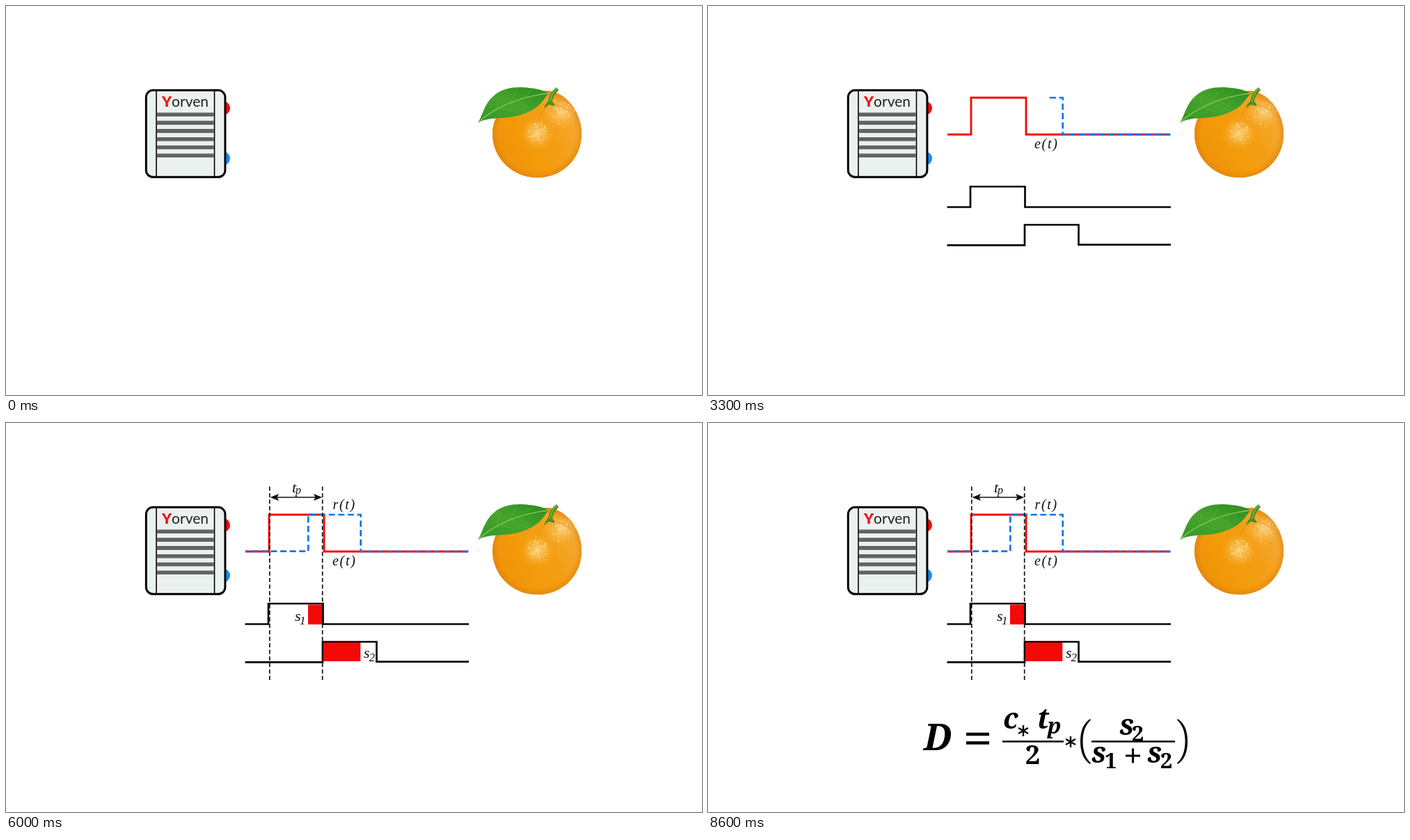
Recreate the animation shown at these times as an HTML page. Size 1000 px wide and 560 px high, loop 9.6 s.

```html
<!DOCTYPE html>
<html lang="en">
<head>
<meta charset="utf-8">
<title>Pulsed time of flight</title>
<style>
  html, body { margin: 0; width: 100%; height: 100%; overflow: hidden; background: #fff; }
  svg { display: block; width: 100vw; height: 100vh; }
  .label { font: italic 20px "Liberation Serif", serif; fill: #111; }
  .wave { fill: none; stroke-width: 2.7; stroke: #050505; }
  .math { font: italic bold 41px "Noto Serif", serif; }
  .num { font-style: normal; }
  .sub { font-size: 31px; }
</style>
</head>
<body>
<svg viewBox="0 0 1000 560">
  <defs>
    <linearGradient id="peel" x1="0" y1=".75" x2="1" y2=".25">
      <stop offset="0" stop-color="#ee910b"/>
      <stop offset=".35" stop-color="#f39a08"/>
      <stop offset=".65" stop-color="#f49f17"/>
      <stop offset="1" stop-color="#f5ac3a"/>
    </linearGradient>
    <radialGradient id="rim">
      <stop offset=".86" stop-color="#d97a10" stop-opacity="0"/>
      <stop offset="1" stop-color="#d97a10" stop-opacity=".5"/>
    </radialGradient>
    <radialGradient id="glow">
      <stop offset="0" stop-color="#fff0bd" stop-opacity=".85"/>
      <stop offset="1" stop-color="#fcc050" stop-opacity="0"/>
    </radialGradient>
    <linearGradient id="leaf" x1="0" y1="1" x2="1" y2="0">
      <stop offset="0" stop-color="#35932a"/>
      <stop offset=".5" stop-color="#46a52c"/>
      <stop offset="1" stop-color="#2b8b20"/>
    </linearGradient>
  </defs>

  <g id="camera">
    <circle cx="312" cy="147" r="10" fill="#f70606"/>
    <circle cx="312" cy="219.5" r="10" fill="#168af6"/>
    <rect x="201.3" y="121.3" width="113.6" height="125" rx="10" fill="#ebf1ee" stroke="#000" stroke-width="3"/>
    <path d="M216 122V246M299.5 122V246" stroke="#000" stroke-width="1.6"/>
    <path id="slots" stroke="#636363" stroke-width="5.6"/>
    <text x="224" y="145" font-family="Lato, sans-serif" font-size="21" fill="#222"><tspan fill="#f01414" font-weight="900">Y</tspan>orven</text>
  </g>

  <g id="orange">
    <path id="body" d="M699 182C700 155 722 126 775 122C802 121 827 151 827 184C827 220 799 247 763 247C727 247 698 218 699 182Z" fill="url(#peel)"/>
    <use href="#body" style="fill:url(#rim)"/>
    <path d="M699 182C700 155 722 126 775 122C802 121 827 151 827 184C827 220 799 247 763 247C727 247 698 218 699 182Z" fill="url(#rim)"/>
    <ellipse cx="797" cy="153" rx="27" ry="23" fill="url(#glow)" opacity=".7"/>
    <ellipse cx="763" cy="184" rx="25" ry="24" fill="url(#glow)" opacity=".75"/>
    <g id="pores" fill="#ffeab0"/>
    <path d="M784 142Q798 142 811 152M781 145Q789 150 791 158M778 145Q769 151 765 160" fill="none" stroke="#d98010" stroke-width="1" opacity=".6"/>
    <path d="M773 147Q774 142 779 137Q781 124 791 117L794 121Q785 130 785 138Q789 141 788 144L780 142Z" fill="#4c8f20"/>
    <path d="M782 138Q783 126 792 118" fill="none" stroke="#86b83d" stroke-width="1.5"/>
    <path d="M678 168C685 157 687 141 700 130C714 116 736 116 752 118C765 119 772 122 780 126C774 131 771 139 763 145C751 155 731 160 714 161C699 162 689 162 678 168Z" fill="url(#leaf)"/>
    <path d="M679 167C702 146 739 130 779 126" fill="none" stroke="#8ac951" stroke-width="1.3"/>
    <path d="M705 149L709 132M724 139L733 123M744 132L755 121M710 146L729 152M733 136L750 145" fill="none" stroke="#68b83f" stroke-width=".8" opacity=".7"/>
  </g>

  <path id="emit" class="wave" style="stroke:#f50a0a;stroke-width:2.9" d="M344 185H378V132H457V185H664"/>
  <path id="back" class="wave" style="stroke:#1173ea" stroke-dasharray="9 4.6" d="M664.5 185H509.7V132H434.3V184.7H344"/>
  <path id="gate1" class="wave" d="M343.5 289.5H377V260H455.5V289.5H665"/>
  <path id="gate2" class="wave" d="M343.5 344.3H455V315H532.5V343.7H665"/>
  <path id="charge" fill="#f40909" d="M434 261.5H454V290H434ZM456 316H509.3V343H456Z"/>

  <text id="eText" class="label" x="469" y="204.5" letter-spacing="1.7">e(t)</text>
  <text id="rText" class="label" x="469.5" y="123.5" letter-spacing="1.7">r(t)</text>
  <g id="sText" class="label" style="font-size:22px">
    <text x="415" y="284.5">s</text><text x="422" y="289.5" font-size="17">1</text>
    <text x="514" y="338">s</text><text x="521.5" y="342.5" font-size="17">2</text>
  </g>

  <path id="guides" d="M378.8 91.5V370M454.7 91.5V370" stroke="#111" stroke-width="1.7" stroke-dasharray="6 3.4"/>
  <g id="arrow">
    <path d="M386 107H448" stroke="#111" stroke-width="1.4"/>
    <path d="M379.5 107L392 102L389.5 107L392 112ZM454.3 107L442 102L444.500 107L442 112Z" fill="#111"/>
  </g>
  <g id="tpText" class="label">
    <text x="411" y="99.5" font-size="22">t</text><text x="416" y="102" font-size="16">p</text>
  </g>

  <g id="formula" class="math">
    <text x="310" y="471" style="font-size:52px">D</text>
    <path d="M371 448H404M371 460.500H404" stroke="#000" stroke-width="4.4"/>
    <text x="424" y="440">c</text>
    <text x="473" y="440">t</text>
    <text class="sub" x="488" y="447">p</text>
    <text class="num" x="456" y="491" style="font-size:38px">2</text>
    <text x="591" y="449">s</text>
    <text class="num sub" x="609" y="457.500">2</text>
    <text x="551" y="489">s</text>
    <text class="num sub" x="570" y="497">1</text>
    <text x="631" y="489">s</text>
    <text class="num sub" x="650" y="497">2</text>
    <path d="M423 458.500H511M551 458.500H671" stroke="#000" stroke-width="2.4"/>
    <path d="M600 479H621M610.500 468.500V489.500" stroke="#000" stroke-width="3"/>
    <path d="M549 426Q535 435 535 458.500Q535 482 549 491L550 489.500Q538.500 479 538.500 458.500Q538.500 438 550 427.500ZM675 426Q689 435 689 458.500Q689 482 675 491L674 489.500Q685.500 479 685.500 458.500Q685.500 438 674 427.500Z"/>
    <path id="stars" stroke="#000" stroke-width="2.4"/>
  </g>
</svg>
<script>
const LOOP = 9600, STEP = 100;
const NS = 'http://www.w3.org/2000/svg';
const $ = id => document.getElementById(id);

function add(parent, tag, attrs) {
  const el = parent.appendChild(document.createElementNS(NS, tag));
  for (const k in attrs) el.setAttribute(k, attrs[k]);
  return el;
}

// Repeated details
$('slots').setAttribute('d', Array.from({ length: 6 }, (_, i) => `M216.8 ${156.3 + i * 11.8}H298.7`).join(''));

const star = (x, y) => [0, 60, 120].map(deg => {
  const a = (deg + 90) * Math.PI / 180, dx = 8 * Math.cos(a), dy = 8 * Math.sin(a);
  return `M${x - dx} ${y - dy}L${x + dx} ${y + dy}`;
}).join('');
$('stars').setAttribute('d', star(453, 443) + star(521, 459));

let seed = 7;
const rnd = () => (seed = seed * 16807 % 2147483647) / 2147483647;
function scatter(n, x, y, spread) {
  for (let i = 0; i < n; i++) {
    const a = rnd() * 2 * Math.PI, r = spread * Math.sqrt(rnd());
    add($('pores'), 'circle', {
      cx: x + r * Math.cos(a), cy: y + r * Math.sin(a),
      r: .4 + rnd() * .7, opacity: .3 + rnd() * .6
    });
  }
}
scatter(90, 763, 184, 16);
scatter(40, 801, 157, 18);

// Each wiped part is shown through its own clip rectangle
const svg = document.querySelector('svg');
function wiper(id) {
  const clip = add(svg.querySelector('defs'), 'clipPath', { id: id + 'Clip' });
  const rect = add(clip, 'rect', {});
  $(id).setAttribute('clip-path', `url(#${id}Clip)`);
  return (x0, y0, x1, y1) => {
    const box = { x: x0, y: y0, width: Math.max(0, x1 - x0), height: Math.max(0, y1 - y0) };
    for (const k in box) rect.setAttribute(k, box[k]);
  };
}
const wipe = {};
for (const id of ['emit', 'back', 'gate1', 'gate2', 'charge', 'guides']) wipe[id] = wiper(id);

// Piecewise linear track: time, value, time, value, ...
function track(t, ...p) {
  if (t <= p[0]) return p[1];
  for (let i = 2; i < p.length; i += 2)
    if (t <= p[i]) return p[i - 1] + (p[i + 1] - p[i - 1]) * (t - p[i - 2]) / (p[i] - p[i - 2]);
  return p[p.length - 1];
}
const fade = (id, t, from, to) => $(id).setAttribute('opacity', track(t, from, 0, to, 1));

function draw(time) {
  const t = Math.floor(time / STEP) * STEP;
  const fromLeft = (id, x) => wipe[id](340, 80, x, 380);

  fromLeft('emit', track(t, 0, 340, 2000, 633, 2200, 668));
  fromLeft('gate1', track(t, 0, 340, 2000, 626, 2200, 668));
  fromLeft('gate2', track(t, 200, 340, 2000, 589, 2200, 668));
  fade('eText', t, 900, 1800);

  wipe.back(track(t, 2300, 668, 3300, 490, 3650, 430, 4200, 430, 4500, 385, 4800, 340), 80, 668, 380);
  fade('rText', t, 3300, 3900);
  fromLeft('charge', track(t, 3600, 433, 4300, 511));
  fade('sText', t, 3700, 4300);

  wipe.guides(340, 80, 480, track(t, 4500, 90, 5100, 372));
  fade('tpText', t, 4700, 5300);
  fade('arrow', t, 4800, 5400);

  fade('formula', t, 6000, 6800);
  $('formula').setAttribute('transform', `translate(0 ${track(t, 6000, 32, 6800, 0)})`);
}

function tick() {
  draw(performance.now() % LOOP);
  requestAnimationFrame(tick);
}
tick();
</script>
</body>
</html>
```
